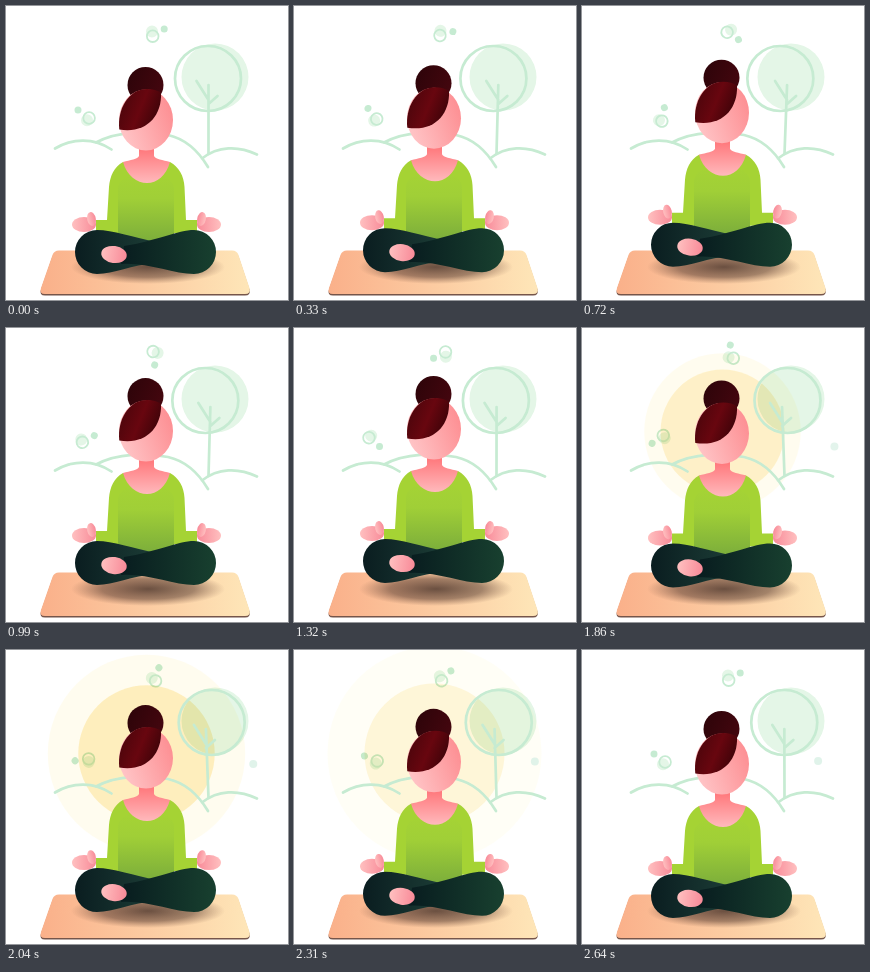
These frames come from a looping animation (282x294 px, 2670 ms). An HTML page:

```html
<!DOCTYPE html>
<html>
<head>
<meta charset="utf-8">
<style>
  html, body { margin: 0; width: 100%; height: 100%; overflow: hidden; background: #fff; }
  svg { display: block; width: 100vw; height: 100vh; }
  .line { fill: none; stroke: #c6ebd2; stroke-width: 2.7; stroke-linecap: round; }
  .ring { fill: none; stroke: #c6ebd2; stroke-width: 1.8; }
  .pale { fill: #e4f6e7; }
  .dot { fill: #c6ebd2; }
  .tint { mix-blend-mode: multiply; }
</style>
</head>
<body>
<svg viewBox="0 0 282 294">
  <defs>
    <linearGradient id="matFill"><stop stop-color="#fab08a"/><stop offset="1" stop-color="#fee6b8"/></linearGradient>
    <radialGradient id="shade">
      <stop stop-color="#3a2620" stop-opacity=".75"/>
      <stop offset=".6" stop-color="#4a3028" stop-opacity=".5"/>
      <stop offset="1" stop-color="#6a4538" stop-opacity="0"/>
    </radialGradient>
    <linearGradient id="skin" x1="0" y1=".7" x2="1" y2=".3"><stop stop-color="#ffc6c8"/><stop offset="1" stop-color="#fd8e92"/></linearGradient>
    <linearGradient id="chest" x2="0" y2="1"><stop stop-color="#ff6e72"/><stop offset="1" stop-color="#ffb9bc"/></linearGradient>
    <linearGradient id="hand"><stop stop-color="#ffc0c0"/><stop offset="1" stop-color="#f88a98"/></linearGradient>
    <linearGradient id="hair" x1="0" y1=".3" x2="1" y2=".7"><stop stop-color="#4a050b"/><stop offset=".5" stop-color="#68060f"/><stop offset="1" stop-color="#380308"/></linearGradient>
    <linearGradient id="bun" x2="1" y2=".4"><stop stop-color="#2c0409"/><stop offset="1" stop-color="#42060e"/></linearGradient>
    <linearGradient id="torso" x2="0" y2="1"><stop stop-color="#a5d335"/><stop offset=".35" stop-color="#a0cf37"/><stop offset="1" stop-color="#7aac3b"/></linearGradient>
    <linearGradient id="backLeg"><stop stop-color="#0a1d20"/><stop offset="1" stop-color="#1c3d36"/></linearGradient>
    <linearGradient id="frontLeg"><stop stop-color="#081c1f"/><stop offset="1" stop-color="#18402f"/></linearGradient>
  </defs>

  <circle id="halo" cx="140.500" cy="103.500" fill="#fffae0"/>
  <circle id="sun" cx="140.500" cy="103.500" fill="#fde6a4"/>

  <circle class="pale tint" cx="209" cy="71" r="33.5"/>
  <ellipse id="crown" class="line" cy="72.5" rx="33" ry="32.5"/>
  <path id="trunk" class="line"/>
  <path class="line" d="M49 142.500C66 132 88 131.500 105.500 143.500M90 136.500C112 125 140 125 162 129C180 133 193 146 202 161M196 152.500C212 140 232 139.500 251 148.500"/>

  <g id="topBubbles" class="tint">
    <circle class="pale" cx="-3" cy="-1.5" r="6"/>
    <circle class="ring" cx="-2.3" cy="3.2" r="5.8"/>
    <circle class="dot" cx="9.2" cy="-3.9" r="3.5"/>
  </g>
  <g id="leftBubbles" class="tint">
    <circle class="pale" cx="2" cy="3.2" r="6"/>
    <circle class="ring" cx="4.1" cy="1" r="5.8"/>
    <circle class="dot" cx="-7" cy="-7" r="3.5"/>
  </g>
  <circle id="drift" fill="#daf1e6" r="4"/>

  <path id="mat" d="M53 244.500H226Q231 244.500 232.500 249L243.500 282Q245 288 239 288H39Q33 288 35 282L46.500 249Q48 244.500 53 244.500Z" transform="translate(0 1.500)" fill="#75554a"/>
  <path d="M53 244.500H226Q231 244.500 232.500 249L243.500 282Q245 288 239 288H39Q33 288 35 282L46.500 249Q48 244.500 53 244.500Z" fill="url(#matFill)"/>
  <ellipse cx="142" cy="261" rx="77" ry="17" fill="url(#shade)"/>

  <g id="figure">
    <g id="leftHand" fill="url(#hand)">
      <ellipse cx="78" cy="218.5" rx="12" ry="7.5"/>
      <ellipse cx="85.5" cy="213" rx="4.3" ry="7" transform="rotate(-12 85.5 213)"/>
    </g>
    <use href="#leftHand" transform="matrix(-1 0 0 1 281 0)"/>
    <path d="M117 156C108 161 104 170 103 181L101 214H90V227H191V214H180L178.500 181C178 170 173 161 164 156Z" fill="#a5d334"/>
    <path d="M112 182V238H168V182Q166 168 140 168Q114 168 112 182Z" fill="url(#torso)"/>
    <path d="M133 150C132 153 124 154 117 156C121 170 131 177 141 177C151 177 160 170 164 156C157 154 149 153 148 150V138H133Z" fill="url(#chest)"/>
    <path d="M91 224C107 224 126 231 150 236V257C125 259 108 268 91 268A22 22 0 0 1 91 224Z" fill="url(#backLeg)"/>
    <path d="M188 224C172 224 150 235 118 240L115 258C140 256 168 268 188 268A22 22 0 0 0 188 224Z" fill="url(#frontLeg)"/>
    <ellipse cx="108" cy="248.500" rx="12.800" ry="8.500" transform="rotate(8 108 248.500)" fill="url(#hand)"/>
    <circle cx="139.500" cy="79" r="18" fill="url(#bun)"/>
    <ellipse cx="140" cy="114" rx="27" ry="30.500" fill="url(#skin)"/>
    <path d="M113.300 123.500C111 104 122 83 141 83Q150 83 155 87C156 111 139 128 113.300 123.500Z" fill="url(#hair)"/>
  </g>
</svg>
<script>
const LOOP = 2670;
const el = id => document.getElementById(id);
const set = (id, attrs) => {
  for (const name in attrs) el(id).setAttribute(name, attrs[name]);
};
const ramp = (t, from, to) => Math.min(1, Math.max(0, (t - from) / (to - from)));
const easeOut = q => 1 - (1 - q) ** 2;

function draw(t) {
  const p = t / LOOP;

  const lift = 13 * Math.sin(Math.PI * p) ** 2;
  set('figure', { transform: `translate(0 ${-lift})` });

  const turn = 180 * (1 - Math.cos(Math.PI * Math.min(1, p + 0.012 * Math.sin(Math.PI * p))));
  set('topBubbles', { transform: `translate(149 27) rotate(${turn})` });
  set('leftBubbles', { transform: `translate(79 111) rotate(${turn})` });

  const sway = 3.7 * Math.sin(2 * Math.PI * p);
  set('crown', { cx: 202 - sway });
  const x = 202.5 + sway * 0.7;
  set('trunk', { d: `M202.500 148L${x} 79M${x - 12} 75L${x} 94M${x + 9} 90L${x} 98` });

  const fade = 1 - ramp(t, 2130, 2560);
  set('sun', { r: 70 * easeOut(ramp(t, 1200, 2200)), opacity: 0.65 * ramp(t, 1200, 2040) * fade });
  set('halo', { r: 107 * easeOut(ramp(t, 1500, 2250)), opacity: 0.5 * fade });

  const left = 1 - ramp(t, 1600, LOOP);
  set('drift', {
    cx: 236 + 25 * left ** 1.5,
    cy: 111 + 20 * left ** 3.5,
    opacity: 0.85 * ramp(t, 1560, 1900)
  });
}

function tick(now) {
  draw(now % LOOP);
  requestAnimationFrame(tick);
}
tick(performance.now());
</script>
</body>
</html>
```
